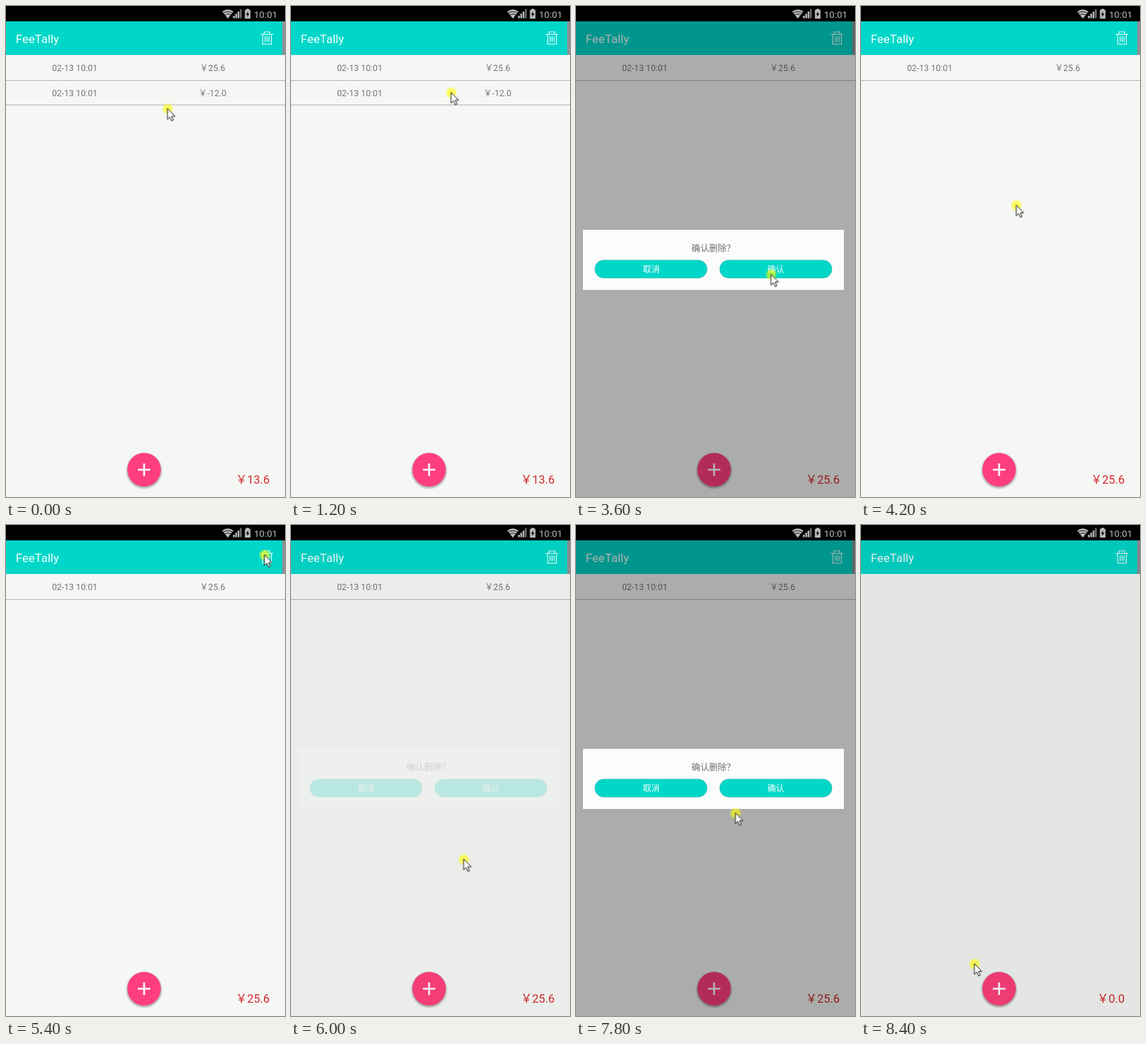
Animation of 400x702 px, one loop 9 s. Source, as an HTML page:

```html
<!DOCTYPE html>
<html lang="zh">
<head>
<meta charset="utf-8">
<title>Expense list</title>
<style>
html, body { margin: 0; height: 100%; overflow: hidden; background: #f5f7f4; }
svg { display: block; width: 100%; height: 100%; font-family: Roboto, "Noto Sans CJK SC", "Noto Sans CJK", sans-serif; }
.row { font-size: 12.4px; fill: #747674; text-anchor: middle; }
.rule { stroke: #b0b2b0; }
.total { font-size: 16.5px; fill: #d3272d; text-anchor: end; }
.label { font-size: 12px; fill: #fff; text-anchor: middle; }
.pill { fill: #00d7c9; stroke: #4fb3a9; stroke-width: .6; }

/* every change is a hard cut on a 600 ms grid */
.cursor, .dim, .dialog, .two, .one, .none { animation: 9s step-end infinite; }
.cursor { animation-name: move; }
.dim { animation-name: dim; }
.dialog { animation-name: dialog; }
.two { animation-name: two; }
.one { animation-name: one; }
.first { animation-name: first; }
.none { animation-name: none-left; }

@keyframes move {
  0% { transform: translate(231.5px, 146.5px); }
  6.666% { transform: translate(229.5px, 123.5px); }
  26.666% { transform: translate(271.5px, 351.5px); }
  33.333% { transform: translate(279.5px, 383.5px); }
  46.666% { transform: translate(222.5px, 284.5px); }
  53.333% { transform: translate(364.5px, 58.5px); }
  60% { transform: translate(370.5px, 42.5px); }
  66.666% { transform: translate(247.5px, 477.5px); }
  73.333% { transform: translate(268.5px, 392.5px); }
  80% { transform: translate(285.5px, 378.5px); }
  86.666% { transform: translate(228.5px, 411.5px); }
  93.333%, 100% { transform: translate(162.5px, 627px); }
}
@keyframes dim {
  0%, 46.666%, 100% { opacity: 0; }
  26.666%, 73.333% { opacity: .3; }
  66.666% { opacity: .04; }
  93.333% { opacity: .07; }
}
@keyframes dialog {
  0%, 46.666%, 93.333%, 100% { opacity: 0; }
  26.666%, 73.333% { opacity: 1; }
  66.666% { opacity: .21; }
}
@keyframes two { 0% { opacity: 1; } 40%, 100% { opacity: 0; } }
@keyframes one { 0%, 93.333%, 100% { opacity: 0; } 40% { opacity: 1; } }
@keyframes first { 0% { opacity: 1; } 93.333%, 100% { opacity: 0; } }
@keyframes none-left { 0% { opacity: 0; } 93.333%, 100% { opacity: 1; } }
</style>
</head>
<body>
<svg viewBox="0 0 400 702" preserveAspectRatio="none">
  <defs>
    <radialGradient id="glow">
      <stop offset=".6" stop-color="#ff0" stop-opacity=".64"/>
      <stop offset="1" stop-color="#ff0" stop-opacity=".2"/>
    </radialGradient>
    <radialGradient id="shade">
      <stop offset=".84" stop-color="#000" stop-opacity=".32"/>
      <stop offset="1" stop-color="#000" stop-opacity="0"/>
    </radialGradient>
  </defs>

  <rect width="400" height="702" fill="#f5f7f4"/>

  <!-- app bar -->
  <rect y="22" width="400" height="48" fill="#00d7c9"/>
  <rect x="396" y="22" width="4" height="48" fill="#8c9094"/>
  <text x="14" y="53" font-size="17" fill="#f2fffd">FeeTally</text>
  <path d="M365 40.5H383M370 40V37H378V40M368 41V54.5H380.500V41M371.500 43.500V51.500M374.300 43.500V51.500M377.100 43.500V51.500" fill="none" stroke="#e6fffc" stroke-width="1.2"/>

  <!-- list -->
  <g class="row one first">
    <text x="98.500" y="93">02-13 10:01</text>
    <text x="296" y="93">￥25.6</text>
    <path class="rule" d="M0 106.500H400"/>
  </g>
  <g class="row two">
    <text x="98.500" y="129">02-13 10:01</text>
    <text x="296" y="129">￥-12.0</text>
    <path class="rule" d="M0 141.500H400"/>
  </g>
  <text class="total two" x="378" y="682.500">￥13.6</text>
  <text class="total one" x="378" y="682.500">￥25.6</text>
  <text class="total none" x="378" y="682.500">￥0.0</text>

  <!-- add button -->
  <circle cx="198" cy="664.500" r="27" fill="url(#shade)"/>
  <circle cx="198" cy="663" r="24" fill="#ff3f7d"/>
  <path d="M189 663H207M198 654V672" stroke="#fff" stroke-width="2.600"/>

  <rect class="dim" y="22" width="400" height="680"/>

  <g class="dialog">
    <rect x="10" y="320" width="374" height="86" fill="#fbfdfc"/>
    <text x="165.700" y="350.500" font-size="12.500" fill="#6c6e6c">确认删除？</text>
    <rect class="pill" x="27" y="363.300" width="161" height="25.700" rx="12.850"/>
    <rect class="pill" x="206" y="363.300" width="161" height="25.700" rx="12.850"/>
    <text class="label" x="108" y="381">取消</text>
    <text class="label" x="286.500" y="381">确认</text>
  </g>

  <!-- status bar -->
  <rect width="400" height="22"/>
  <g fill="#bcbcbc">
    <path d="M318 18L310 8Q318 2 326 8Z"/>
    <path d="M311 10.500Q318 5.500 325 10.500M313 13.300Q318 9.800 323 13.300" fill="none" stroke="#000" stroke-width=".9"/>
    <path d="M325.500 14h2.400v3.500h-2.400zM328.800 11h2.400v6.500h-2.400zM332.100 8h2.400v9.500h-2.400z"/>
    <path d="M335.400 4.500h2.400v13h-2.400z" fill="#777"/>
    <path d="M342.500 5.500h2.200V4h3.600v1.500h2.200V18h-8z"/>
    <path d="M347.300 7.500L344 12.500h2.200L345.500 16L349 11h-2.200z" fill="#000"/>
    <text x="355.500" y="16.500" font-size="13.500">10:01</text>
  </g>

  <g class="cursor">
    <circle cx=".3" cy=".5" r="8" fill="url(#glow)"/>
    <path d="M0 0V15.500L3.500 12.200L6 17.800L8.500 16.700L6 11.200H10.800Z" fill="#fff" stroke="#111"/>
  </g>
</svg>
</body>
</html>
```
